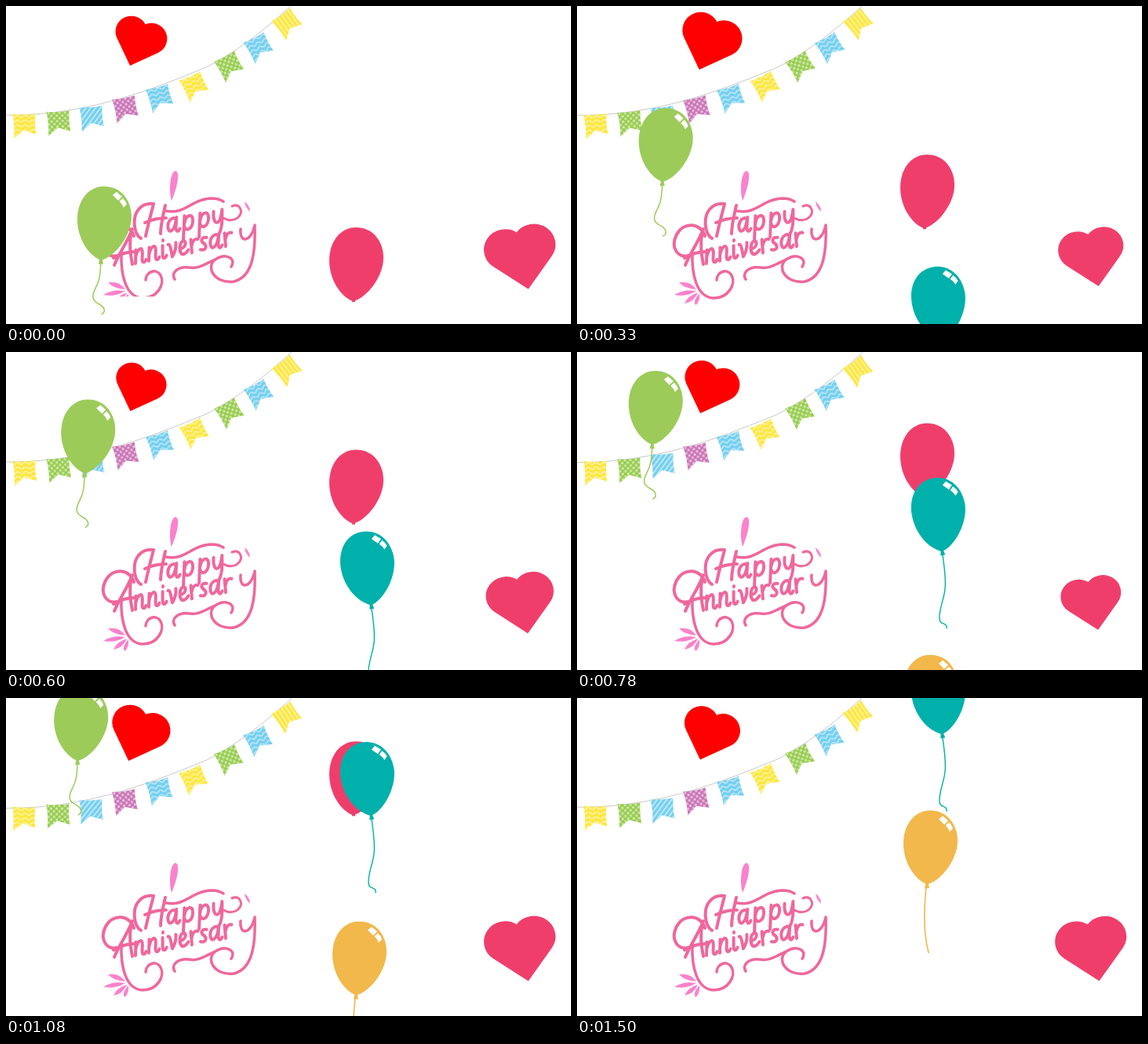
These frames come from a looping animation (720x405 px, 1530 ms). An HTML page:

```html
<!DOCTYPE html>
<html lang="en">
<head>
<meta charset="utf-8">
<title>Happy Anniversary</title>
<style>
html, body { margin: 0; height: 100%; overflow: hidden; background: #fff; }
svg { display: block; width: 720px; height: 405px; }
.line { fill: none; stroke-linecap: round; stroke-linejoin: round; }
</style>
</head>
<body>
<svg viewBox="0 0 720 405" role="img" aria-label="Happy Anniversary">
  <defs>
    <pattern id="dots" width="7" height="7" patternUnits="userSpaceOnUse">
      <g fill="#fff" opacity=".55"><circle cx="2" cy="2" r="1.7"/><circle cx="5.5" cy="5.5" r="1.7"/></g>
    </pattern>
    <pattern id="waves" width="10" height="6" patternUnits="userSpaceOnUse">
      <path class="line" d="M-1 3Q1.5 0 4 3T9 3T14 3" stroke="#fff" stroke-width="1.5" opacity=".6"/>
    </pattern>
    <pattern id="slant" width="5" height="5" patternUnits="userSpaceOnUse" patternTransform="rotate(40)">
      <path d="M0 0H1.7V5H0Z" fill="#fff" opacity=".6"/>
    </pattern>
    <pattern id="bars" width="5" height="5" patternUnits="userSpaceOnUse">
      <path d="M0 0H1.5V5H0Z" fill="#fff" opacity=".6"/>
    </pattern>
    <path id="body" d="M34 0C56 0 69 18 69 39C69 62 48 90 30 94C14 88 0 66 0 42C0 18 14 0 34 0Z"/>
    <path id="knot" d="M28.5 92H31.5L33 99H27Z"/>
    <path id="shine" d="M45 11L50 7L57 13L52 18ZM53.500 19L58 15Q62 19 63 23L59 27Q57 22 53.500 19Z" fill="#fff"/>
    <path id="heart" d="M0 0L-.707-.707A.5.5 0 0 1 0-1.414A.5.5 0 0 1 .707-.707Z" stroke-width=".03" stroke-linejoin="round"/>
  </defs>

  <g id="bunting"><path class="line" d="M0 139C110 140 200 100 255 78C300 55 335 25 364-1" stroke="#c9c9c9"/></g>

  <g id="lettering" class="line" stroke="#ef679d" stroke-width="4">
    <path d="M172 296C162 290 161 268 169 259C174 253 181 251 188 252C185 264 181 279 178 293M203 254C200 267 197 279 197 290M177 276Q190 270 204 270"/>
    <path d="M204 261C228 266 236 246 262 245Q271 245 277 249" stroke-width="3.500"/>
    <path d="M277 270C291 278 304 266 298 257Q295 252 288 255" stroke-width="3"/>
    <path d="M163 293C158 276 136 274 127 291C119 307 127 323 146 317M161 284C154 302 144 315 138 330M160 286C156 304 159 318 161 329M137 321Q150 313 164 313"/>
    <path d="M147 314C146 341 152 371 174 372C193 372 203 354 197 343C191 333 178 339 178 349" stroke-width="3.500"/>
    <path d="M299 284C297 302 312 302 317 279C318 309 316 345 290 351C265 354 253 331 268 322C280 315 294 321 287 332M266 323C251 330 245 335 233 333C219 331 210 340 215 348" stroke-width="3.500"/>
  </g>
  <g fill="#fa82cd">
    <path d="M211 248C207 236 209 211 216 210C222 211 219 229 211 248Z"/>
    <path d="M304 249Q311 254 311 262Q305 257 304 249Z"/>
    <path d="M152 361Q137 360 130 352Q145 350 152 361Z"/>
    <path d="M152 363Q139 371 124 368Q136 360 152 363Z"/>
    <path d="M154 365Q149 377 137 379Q141 369 154 365Z"/>
    <path d="M156 366Q157 377 151 381Q147 376 156 366Z"/>
  </g>
  <path id="cover" d="M115 370H215V405H115Z" fill="#fff"/>

  <g id="balloons">
    <g fill="#f03e6b"><use href="#body"/><path d="M29 92H33V95H29Z"/></g>
    <g fill="#00b0ab" stroke="#00b0ab">
      <path class="line" d="M39 99C45 140 42 145 38 160C34 176 33 185 40 186Q45 188 44 192" stroke-width="1.400"/>
      <g transform="rotate(-10 34.500 46)" stroke="none"><use href="#body"/><use href="#knot"/><use href="#shine"/></g>
    </g>
    <g fill="#f2b84b" stroke="#f2b84b">
      <path class="line" d="M29 98C26 125 25 155 32 181" stroke-width="1.600"/>
      <g stroke="none"><use href="#body"/><use href="#knot"/><use href="#shine"/></g>
    </g>
    <g fill="#9ccb5a" stroke="#9ccb5a">
      <path class="line" d="M30 97C29 112 29 119 23 130C18 140 19 145 26 149C35 153 37 160 31 163" stroke-width="1.500"/>
      <g stroke="none"><use href="#body"/><use href="#knot"/><use href="#shine"/></g>
    </g>
  </g>
  <use id="red" href="#heart" fill="#f00" stroke="#f00"/>
  <use id="pink" href="#heart" fill="#f03e6b" stroke="#f03e6b"/>
</svg>
<script>
const LOOP = 1530, STEP = 30, TAU = 2 * Math.PI;
const $ = id => document.getElementById(id);
const move = (el, transform) => el.setAttribute('transform', transform);
function add(parent, tag, attrs) {
  const el = parent.appendChild(document.createElementNS('http://www.w3.org/2000/svg', tag));
  for (const key in attrs) el.setAttribute(key, attrs[key]);
  return el;
}

// Script letters: baseline at 0, x-height about 18
const glyphs = {
  a: 'M12-16C8-20 1-15 1-7C1 1 8 1 12-14M13-18L11-5C11 1 14 1 16-3',
  n: 'M2-17L0 0M1-8C5-20 11-20 10-12L9-4C9 1 12 1 14-3',
  p: 'M3-18L-1 12M2-8C5-20 15-20 13-9C11 1 3 2 2-4',
  y: 'M1-17C-1-4 3 0 7-4C10-8 11-13 12-18C11-2 10 6 5 13',
  i: 'M2-16L1-4C1 1 4 1 6-3M3-23L3-22',
  v: 'M0-16C3-16 3-8 4 0C8-5 10-11 10-17',
  e: 'M2-8C9-8 11-16 7-17C2-17 0-8 2-3C4 2 9-1 12-5',
  r: 'M1-17L1 0M1-8C3-15 6-18 10-16',
  s: 'M9-16C3-18 1-13 4-10C9-6 8 1 0-2'
};
function write(word, xs, y, slope) {
  [...word].forEach((letter, i) => add($('lettering'), 'path', {
    d: glyphs[letter],
    transform: `translate(${xs[i]} ${y - slope * (xs[i] - xs[0])}) rotate(-9) skewX(-4)`
  }));
}
write('appy', [206, 226, 246, 265], 289, .17);
write('nniversar', [165, 182, 199, 208, 221, 236, 248, 260, 279], 328, .19);

// x, y, angle, colour, pattern
const yellow = '#fde73f', green = '#96cc4c', blue = '#74cfef', purple = '#c972b5';
const flags = [
  [23, 137.5, -1, yellow, 'waves'], [66, 134, -3, green, 'dots'], [108, 128, -4, blue, 'slant'],
  [149.5, 116.5, -10, purple, 'dots'], [192, 103, -15, blue, 'waves'], [234, 89, -24, yellow, 'waves'],
  [278, 64, -27, green, 'dots'], [315.5, 40, -27, blue, 'waves'], [350, 11, -36, yellow, 'bars']
].map(([x, y, angle, colour, pattern]) => {
  const el = add($('bunting'), 'g', {});
  for (const fill of [colour, `url(#${pattern})`])
    add(el, 'path', { d: 'M-14.500 0Q0 2 14.500 0Q13 14 15 26L-1 21L-13.500 31Q-12 15-14.500 0Z', fill });
  return { el, x, y, angle };
});

// Each balloon rises on a sine, fastest at `mid`
const rises = [
  { x: 412, y: 298, reach: 250, mid: -55, end: 1200 },
  { x: 427, y: 248, reach: 330, mid: 549 },
  { x: 416, y: 274, reach: 297, mid: 1110 },
  { x: 93, y: 247, reach: 269, mid: -55, drift: .122, end: 1200 }
];
const balloons = [...$('balloons').children];

// cx, cy: box centre on the stage; ox, oy: box centre within the unit heart
function beat(el, t, { cx, cy, ox, oy, angle, squash, width, swing, period, low, span }) {
  const size = (width - swing * Math.cos(TAU * (t - low) / period)) / span;
  move(el, `translate(${cx - ox * size} ${cy - oy * size}) scale(${size} ${size * squash}) rotate(${angle})`);
}
const redBeat = { cx: 172.5, cy: 44, ox: .3625, oy: -.8, angle: 20, squash: .985,
  width: 70.5, swing: 6.5, period: 700, low: -82, span: 1.68 };
const pinkBeat = { cx: 655.5, cy: 318.7, ox: -.185, oy: -.765, angle: -11, squash: .95,
  width: 84.7, swing: 8.3, period: 540, low: 212, span: 1.71 };

function draw() {
  const t = Math.floor(performance.now() % LOOP / STEP) * STEP;
  const phase = TAU * t / LOOP;

  move($('bunting'), `translate(0 ${.8 - .8 * Math.cos(phase - .5)})`);
  for (const f of flags)
    move(f.el, `translate(${f.x} ${f.y}) rotate(${f.angle - 2.5 * Math.sin(phase)})`);

  rises.forEach((b, i) => {
    const lift = b.reach * Math.sin(.00117 * (t - b.mid));
    move(balloons[i], `translate(${b.x - lift * (b.drift || 0)} ${b.y - lift})`);
    balloons[i].style.display = t >= b.end ? 'none' : '';
  });

  beat($('red'), t, redBeat);
  beat($('pink'), t, pinkBeat);
  $('cover').style.display = t < STEP ? '' : 'none';
  requestAnimationFrame(draw);
}
draw();
</script>
</body>
</html>
```
